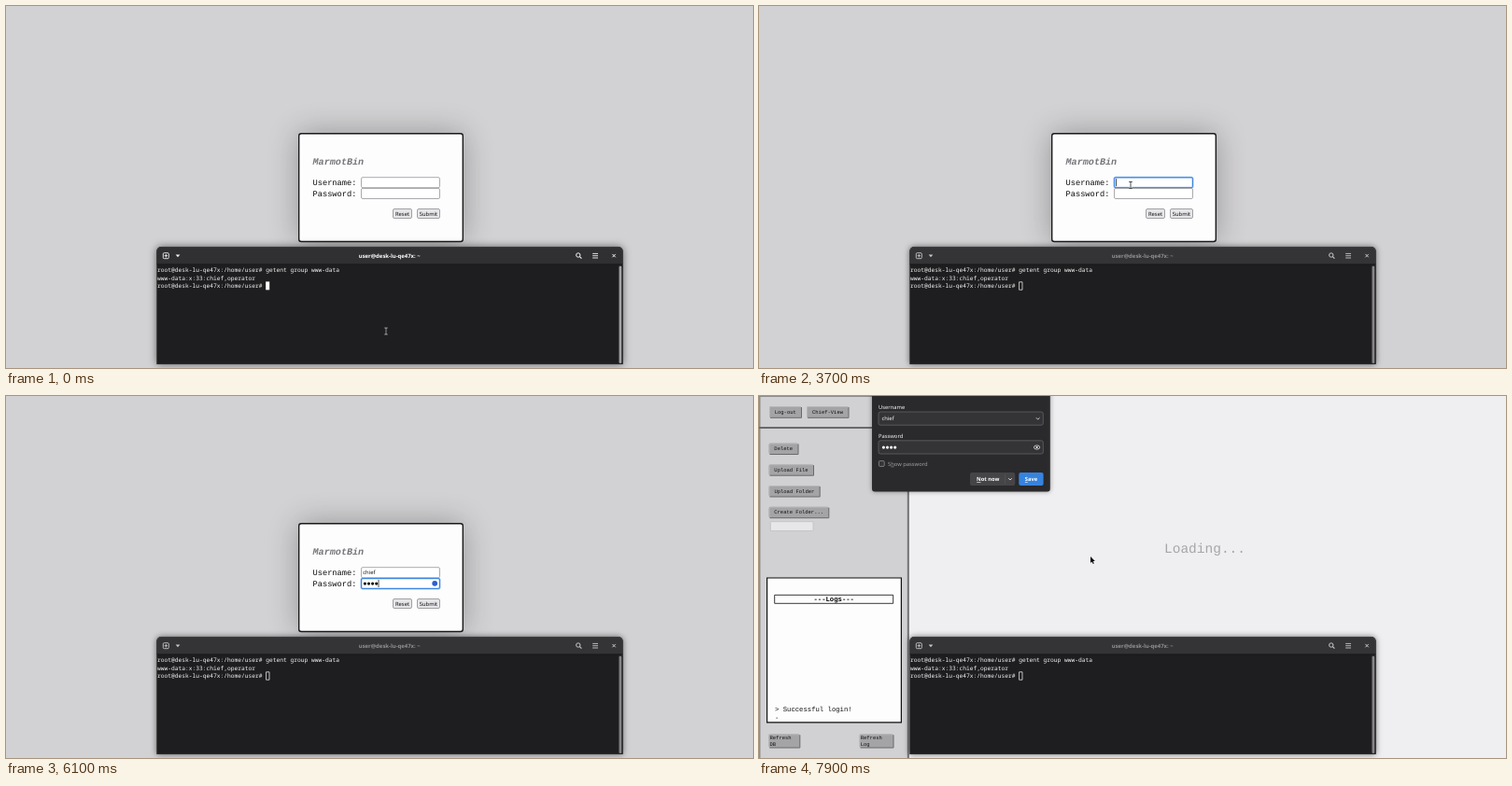
These frames come from a looping animation (800x388 px, 8000 ms). An HTML page with a canvas:

```html
<!DOCTYPE html>
<html lang="en">
<head>
<meta charset="utf-8">
<title>Login demo</title>
<style>
html, body { margin: 0; width: 100%; height: 100%; overflow: hidden; background: #d2d1d3; }
canvas { display: block; width: 100%; height: 100%; }
</style>
</head>
<body>
<canvas id="stage" width="800" height="388"></canvas>
<script>
const ctx = document.getElementById('stage').getContext('2d');
const LOOP = 8000, STEP = 100;
const SANS = '"Noto Sans", sans-serif';
const MONO = '"Liberation Mono", monospace';
const TERM = '"Noto Sans Mono", monospace';
const HOST = 'desk-lu-qe47x', USER = 'chief';
const PROMPT = `root@${HOST}:/home/user# `;

// Pointer path: time, x, y
const PATH = [
  [0, 407, 348.5], [100, 407, 348.5], [200, 385, 285], [300, 423.5, 204.5],
  [600, 423.5, 204.5], [1100, 369, 269], [1200, 369, 269], [1700, 337.5, 303.5],
  [2100, 316, 313], [2200, 316, 313], [3000, 389, 236], [3400, 398, 192],
  [7400, 398, 192], [7500, 411, 174], [7600, 412, 150], [7700, 397, 138],
  [7800, 371, 156], [7900, 355, 172], [8000, 355, 172]
];

const clamp = v => Math.max(0, Math.min(1, v));
const ramp = (t, from, to) => clamp((t - from) / (to - from));
const ease = v => v * v * (3 - 2 * v);

function pointerAt(t) {
  const i = Math.max(1, PATH.findIndex(p => p[0] >= t));
  const a = PATH[i - 1], b = PATH[i];
  const k = ease(ramp(t, a[0], b[0]));
  return [a[1] + (b[1] - a[1]) * k, a[2] + (b[2] - a[2]) * k];
}

function rect(x, y, w, h, fill) {
  ctx.fillStyle = fill;
  ctx.fillRect(x, y, w, h);
}

function box(x, y, w, h, r, fill, stroke, lw = 1) {
  ctx.beginPath();
  ctx.roundRect(x, y, w, h, r);
  if (fill) { ctx.fillStyle = fill; ctx.fill(); }
  if (stroke) { ctx.strokeStyle = stroke; ctx.lineWidth = lw; ctx.stroke(); }
}

function shadowed(blur, alpha, draw) {
  ctx.save();
  ctx.shadowColor = `rgba(0,0,0,${alpha})`;
  ctx.shadowBlur = blur;
  draw();
  ctx.restore();
}

function text(str, x, y, size, color, family = SANS, style = '', align = 'left') {
  ctx.font = `${style} ${size}px ${family}`;
  ctx.textAlign = align;
  ctx.fillStyle = color;
  ctx.fillText(str, x, y);
}

function line(color, lw, ...pts) {
  ctx.beginPath();
  pts.forEach(([x, y], i) => i ? ctx.lineTo(x, y) : ctx.moveTo(x, y));
  ctx.strokeStyle = color;
  ctx.lineWidth = lw;
  ctx.stroke();
}

function dot(x, y, r, color) {
  ctx.beginPath();
  ctx.arc(x, y, r, 0, 7);
  ctx.fillStyle = color;
  ctx.fill();
}

function chevron(x, y, color) {
  line(color, 0.8, [x - 1.8, y - 0.9], [x, y + 0.9], [x + 1.8, y - 0.9]);
}

function field(y, focused) {
  if (focused) {
    box(380.5, y, 84, 11, 1.5, '#fff', '#9cc5f5', 2);
    box(380.5, y, 84, 11, 1.5, null, '#3f86dc', 1);
  } else {
    box(380.5, y, 84, 11, 1.5, '#fff', '#96959a', 0.8);
  }
}

function formButton(label, x, w) {
  box(x, 217.5, w, 10, 1.5, '#e6e5e8', '#8d8c90', 0.8);
  text(label, x + w / 2, 224.6, 5.8, '#111', SANS, '', 'center');
}

function caret(x, y) {
  rect(x, y, 0.8, 8, '#222');
}

function menu(y) {
  shadowed(3, 0.4, () => box(381, y, 114.5, 37, 1.5, '#2d323c'));
  text('No items to show', 385, y + 12.3, 7.2, '#f2f3f5');
  rect(381, y + 18.2, 114.5, 0.8, '#4b515d');
  line('#6f9df1', 1, [387.5, y + 28], [394.5, y + 28]);
  line('#6f9df1', 1, [391, y + 24.5], [391, y + 31.5]);
  text('New item', 398.3, y + 30.7, 7.4, '#6f9df1', SANS, 'bold');
}

function form(t) {
  shadowed(32, 0.3, () => box(313.7, 136.7, 175.6, 115.8, 2.5, '#fdfdfe'));
  box(313.7, 136.7, 175.6, 115.8, 2.5, null, '#1a1a1c', 1.4);
  text('MarmotBin', 328.5, 170.3, 10.15, '#777579', MONO, 'italic bold');
  text('Username:', 328.5, 191.8, 8.7, '#0c0c0c', MONO);
  text('Password:', 328.5, 203.7, 8.7, '#0c0c0c', MONO);

  const onPass = t >= 4800, onName = t >= 3500 && !onPass;
  field(183.7, onName);
  field(195.5, onPass);
  formButton('Reset', 414.5, 20);
  formButton('Submit', 440.5, 24);

  const typed = USER.slice(0, t < 4200 ? 0 : (t - 4100) / STEP);
  text(typed, 382.3, 191.2, 5.8, '#111');
  if (onName) caret(382.2 + ctx.measureText(typed).width, 185.2);

  const dots = t < 5800 ? 0 : Math.min(4, (t - 5700) / STEP);
  for (let i = 0; i < dots; i++) dot(384.4 + i * 4.1, 201.1, 1.6, '#111');
  if (onPass) caret(382.2 + dots * 4.1, 197);

  if (onName && t >= 4000) dot(459.2, 189.2, 2.9, '#2f5fd0');
  if (t >= 4900 && t < 6400) dot(459.2, 200.8, 2.9, '#2f5fd0');
  if (t >= 4000 && t < 4200) menu(194.7);
  if (t >= 4900 && t < 5700) menu(206.5);
}

function pageButton(lines, x, y, w, h, soft) {
  box(x, y, w, h, 2, soft ? '#d5d4d6' : '#a4a3a6');
  line(soft ? '#f1f0f2' : '#bbbabd', 0.8, [x + 0.5, y + h - 1], [x + 0.5, y + 0.5], [x + w - 1, y + 0.5]);
  line('#69686b', 1, [x + 1, y + h], [x + w, y + h], [x + w, y + 1]);
  if (lines.length === 1) text(lines[0], x + w / 2, y + h / 2 + 1.7, 5.5, '#111', MONO, '', 'center');
  else lines.forEach((s, i) => text(s, x + 1.2, y + 6 + i * 6.2, 5.5, '#111', MONO));
}

function dashboard(t) {
  const soft = t < 6700;
  rect(0, 0, 800, 388, '#efeef0');
  rect(0, 0, 160, 388, '#d1d0d2');
  rect(0, 0, 160, 1, '#8d8c8f');
  rect(0, 0, 1.5, 388, '#8d8c8f');
  rect(0, 33, 160, 2, '#69686b');
  rect(158.8, 0, 2, 388, '#727174');

  pageButton(['Log-out'], 11, 11, 34.5, 12.3, soft);
  pageButton(['Chief-View'], 51, 11, 45, 12.3, soft);
  pageButton(['Delete'], 10.5, 50.5, 31.5, 12, soft);
  pageButton(['Upload File'], 10.5, 73.2, 48, 12, soft);
  pageButton(['Upload Folder'], 10.5, 96, 54.7, 12, soft);
  pageButton(['Create Folder...'], 10.5, 118.7, 64.3, 12, soft);
  box(12.3, 134.7, 45.7, 9.8, 0.5, soft ? '#fdfdfe' : '#e7e6e8', soft ? '#8f8e92' : '#c0bfc2', 0.8);

  box(8.6, 195, 143.8, 154.8, 0, '#fdfdfe', '#111', 1.2);
  box(16.7, 213.3, 127, 9, 0, null, '#222', 0.9);
  text('---Logs---', 80.2, 220.2, 7.25, '#000', MONO, 'bold', 'center');
  if (!soft) {
    text('> Successful login!', 17, 338.4, 7.25, '#111', MONO);
    text('-', 17, 346.8, 7.25, '#111', MONO);
  }
  pageButton(['Refresh', 'DB'], 10.3, 362.3, 33.5, 14.7, soft);
  pageButton(['Refresh', 'Log'], 107.5, 362.3, 36.5, 14.7, soft);
  text('Loading...', 434, 168, 14.5, '#a6a5a8', MONO);
}

function terminal(t) {
  const away = ramp(t, 3400, 3700);
  const g = Math.round(255 - 110 * away);
  shadowed(9 - 3 * away, 0.55, () => box(161.3, 258, 499.4, 126, [5, 5, 0, 0], '#1e1d1f'));
  box(161.3, 258, 499.4, 19, [5, 5, 0, 0], away > 0.5 ? '#343335' : '#302f31');
  rect(161.3, 276.5, 499.4, 0.8, '#141415');
  box(161.6, 258.3, 498.8, 125.5, [5, 5, 0, 0], null, 'rgba(90,90,92,.5)', 0.6);
  text(`user@${HOST}: ~`, 410.7, 269.7, 5.95, `rgb(${g},${g},${g})`, SANS, 'bold', 'center');

  const ic = away > 0.5 ? '#c9c8ca' : '#f4f4f4';
  box(168.3, 264.7, 6, 6, 1, null, ic, 0.9);
  line(ic, 0.9, [169.6, 267.7], [173, 267.7]);
  line(ic, 0.9, [171.3, 266], [171.3, 269.4]);
  ctx.beginPath();
  ctx.moveTo(181.7, 266.5);
  ctx.lineTo(186.3, 266.5);
  ctx.lineTo(184, 269.2);
  ctx.fillStyle = ic;
  ctx.fill();
  ctx.beginPath();
  ctx.arc(612.8, 267, 2.2, 0, 7);
  ctx.strokeStyle = ic;
  ctx.lineWidth = 1;
  ctx.stroke();
  line(ic, 1.2, [614.4, 268.6], [616.4, 270.6]);
  for (const y of [265.4, 267.7, 270]) line(ic, 0.9, [628.2, y], [634, y]);
  line(ic, 1, [649.4, 265.9], [652.8, 269.3]);
  line(ic, 1, [652.8, 265.9], [649.4, 269.3]);

  rect(655.7, 278, 4.8, 105.5, '#2a292b');
  box(656.6, 278.7, 2.6, 104.3, 1.3, away > 0.5 ? '#858486' : '#a3a2a4');

  const rows = [PROMPT + 'getent group www-data', `www-data:x:33:${USER},operator`, PROMPT];
  rows.forEach((s, i) => text(s, 162, 284.8 + i * 8.75, 6.26, '#f3f3f3', TERM));
  if (t >= 3500) box(278.6, 295.8, 3.4, 8.4, 0, null, '#e8e8e8', 0.8);
  else if ((t + 100) % 1200 < 600) rect(278.2, 295.4, 4, 8.9, '#fff');
}

function dialog(alpha) {
  const pale = '#f6f6f8';
  ctx.save();
  ctx.globalAlpha = alpha;
  shadowed(5, 0.4, () => box(121, -8, 190.8, 110.6, 3, '#2a292b'));
  text('Username', 128, 13.8, 5.8, pale);
  box(128, 17, 176.3, 14.2, 2, '#343336', '#646367', 0.8);
  text(USER, 131.5, 26.2, 5.8, pale);
  chevron(298.7, 24.2, pale);
  text('Password', 128, 44.6, 5.8, pale);
  box(128, 47.8, 176.3, 14.2, 2, '#343336', '#646367', 0.8);
  for (let i = 0; i < 4; i++) dot(133.4 + i * 4.1, 55.1, 1.6, pale);

  ctx.beginPath();
  ctx.ellipse(297.6, 55, 3.2, 2.1, 0, 0, 7);
  ctx.strokeStyle = pale;
  ctx.lineWidth = 0.7;
  ctx.stroke();
  dot(297.6, 55, 1.1, pale);

  box(128.4, 69.6, 5.8, 5.8, 1, '#343336', '#8f8e92', 0.8);
  text('Show password', 138, 74.6, 5.8, '#a09fa3');
  rect(141.2, 75.6, 3.4, 0.6, '#a09fa3');
  box(226, 82, 48.3, 14, 2, '#454447');
  rect(263.5, 83.5, 0.6, 11, '#5a595d');
  text('Not now', 233, 91, 5.75, '#fff', SANS, 'bold');
  rect(233.2, 92, 4.3, 0.6, '#fff');
  chevron(269, 89.1, pale);
  box(278.3, 82, 26.3, 14, 2, '#3683de');
  text('Save', 291.4, 91, 5.75, '#fff', SANS, 'bold', 'center');
  rect(284.8, 92, 3, 0.6, '#fff');
  ctx.restore();
}

function statusBar(label) {
  box(-2, 379.2, 136.8, 12, [0, 2, 0, 0], '#2a292b', '#4d4c50', 0.6);
  text(label, 1.8, 386.4, 5.75, '#f4f4f6');
}

function arrow(x, y) {
  ctx.beginPath();
  [[0, 0], [0, 7], [1.6, 5.5], [2.7, 8], [3.8, 7.5], [2.8, 5.1], [4.9, 5]]
    .forEach(([dx, dy]) => ctx.lineTo(x + dx, y + dy));
  ctx.closePath();
  ctx.strokeStyle = 'rgba(255,255,255,.8)';
  ctx.lineWidth = 1;
  ctx.stroke();
  ctx.fillStyle = '#0a0a0a';
  ctx.fill();
}

function beam(x, y, dark) {
  const pen = (color, lw) => {
    line(color, lw, [x, y - 3.5], [x, y + 3.5]);
    for (const dy of [-3.5, 3.5]) line(color, lw, [x - 1.8, y + dy], [x + 1.8, y + dy]);
  };
  pen(dark ? '#000' : 'rgba(255,255,255,.8)', 2);
  pen(dark ? '#d8d8d8' : '#222', 0.8);
}

function pointer(t) {
  if (t >= 4200 && t < 6400) return;
  const [x, y] = pointerAt(t);
  const inTerm = y > 277;
  const inField = x > 380 && x < 465 && y > 183 && y < 207;
  if (t < 6400 && (inTerm || inField)) beam(x, y, inTerm);
  else arrow(x, y);
}

function draw(t) {
  ctx.textRendering = 'geometricPrecision';
  if (t < 6600) {
    rect(0, 0, 800, 388, '#d2d1d3');
    form(t);
  } else {
    dashboard(t);
  }
  terminal(t);
  if (t >= 6400) dialog(t < 6500 ? 0.5 : 1);
  if (t >= 6400 && t < 6700) statusBar(t < 6600 ? HOST : `Transferring data from ${HOST}…`);
  pointer(t);
}

const start = performance.now();
function tick() {
  const t = (performance.now() - start) % LOOP;
  draw(Math.floor(t / STEP) * STEP);
  requestAnimationFrame(tick);
}
tick();
</script>
</body>
</html>
```
